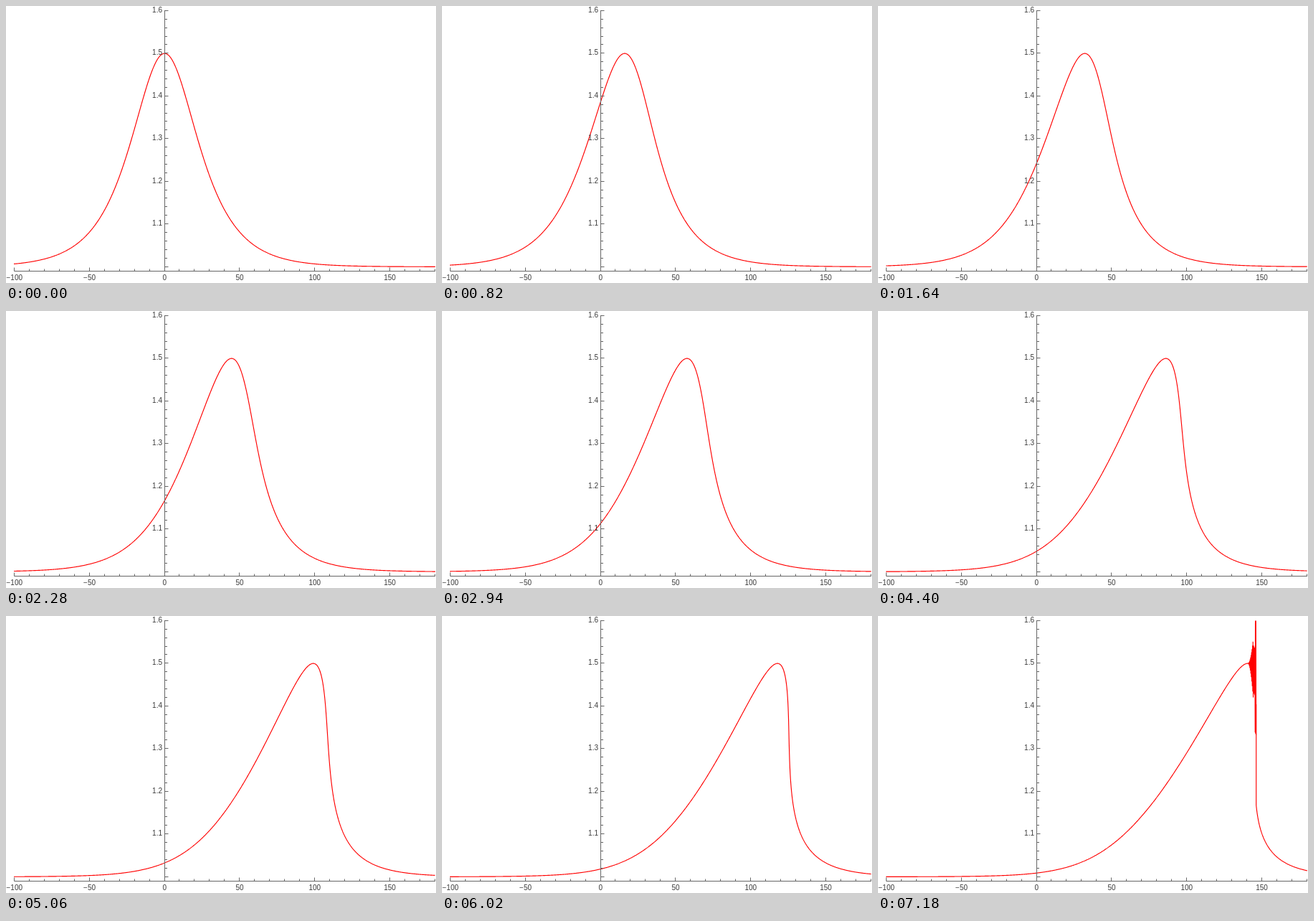
Write an HTML page that moves like this. It is 600 px wide and 386 px high and loops after 7.2 s.

```html
<!DOCTYPE html>
<html lang="en">
<head>
<meta charset="utf-8">
<title>Steepening wave</title>
<style>
  html, body { margin: 0; width: 100%; height: 100%; overflow: hidden; background: #fff; }
  svg { display: block; width: 600px; height: 386px; }
  text { font: 10px "Liberation Sans", Arial, sans-serif; fill: #3a3a3a; }
</style>
</head>
<body>
<svg viewBox="0 0 600 386">
  <clipPath id="plot"><rect x="11" y="6.5" width="588" height="363"/></clipPath>
  <path id="wave" clip-path="url(#plot)" fill="none" stroke="#f00" stroke-width="1.15" stroke-linejoin="bevel"/>
  <path id="axes" fill="none" stroke="#666" stroke-width="1"/>
  <g id="labels"></g>
</svg>
<script>
const LOOP = 7200, STEP = 20;
const PEAK_SPEED = 0.01957;          // plot units per ms
const BASE = 0.667, BEND = 0.055;    // local speed relative to the peak
const WIDTH = 20, HEIGHT = 0.5;
const BREAK = 129, BREAK_SPAN = 11.5; // peak travel where ripples start and grow
const wave = document.getElementById('wave');

const px = x => 221.3 + 2.095 * x;
const py = h => 363.4 - 594.6 * (h - 1);
const snap = v => Math.floor(v - 0.3) + 0.5;
const point = p => px(p.x).toFixed(2) + ' ' + py(p.h).toFixed(2);

function drawAxes() {
  let d = 'M221.5 6V369.5M11.5 369.5H599';
  let labels = '';
  for (let x = -100; x <= 180; x += 10) {
    const major = x % 50 === 0;
    d += `M${snap(px(x))} 369.5v${major ? -5 : -3}`;
    if (major) {
      const label = String(x).replace('-', '\u2212');
      labels += `<text x="${px(x)}" y="382" text-anchor="middle">${label}</text>`;
    }
  }
  for (let i = 0; i <= 30; i++) {
    const h = 1 + i / 50, y = py(h), major = i % 5 === 0;
    d += `M221.5 ${snap(y)}h${major ? 5 : 3.5}`;
    if (major && i) {
      labels += `<text x="218" y="${Math.floor(y + 2.6)}" text-anchor="end">${h.toFixed(1)}</text>`;
    }
  }
  document.getElementById('axes').setAttribute('d', d);
  document.getElementById('labels').innerHTML = labels;
}

// Each height travels at its own speed, so the front steepens.
function carry(start, shift) {
  const r = 1 / Math.cosh(start / WIDTH);
  const speed = BASE + (1 - BASE) * r + BEND * r * (1 - r);
  return { x: start + shift * speed, h: 1 + HEIGHT * r };
}

function ripple(u) {
  if (u < 0.65) return 0.07 * (u / 0.65) ** 2;
  return u < 0.85 ? 0.055 : 0.14;
}

// Dense zigzag between the crest and the shock.
function addRipples(crest, shift) {
  const shock = crest[crest.length - 1];
  const growth = Math.min(1, Math.max(0, (shift - BREAK) / BREAK_SPAN));
  const start = shock.x - 5.5 * growth;
  const line = crest.filter(p => p.x < start);
  const top = line[line.length - 1].h;
  let sign = 1;
  for (let x = start; x < shock.x; x += 0.16) {
    const u = (x - start) / (shock.x - start);
    sign = -sign;
    line.push({ x, h: top + 0.3 * (shock.h - top) * u * u + sign * growth ** 2 * ripple(u) });
  }
  return [...line, shock];
}

function profile(shift) {
  const crest = [], tail = [];
  let front = -Infinity, folded = false;
  for (let s = -240; s <= 190; s += 0.25) {
    const p = carry(s, shift);
    if (p.x < front) { folded = true; continue; }
    front = p.x;
    (folded ? tail : crest).push(p);
  }
  if (!folded) return crest;
  const shock = crest[crest.length - 1];
  return [...addRipples(crest, shift), { x: shock.x, h: tail[0].h }, ...tail];
}

function render(time) {
  const visible = profile(PEAK_SPEED * time).filter(p => p.x >= -100.5 && p.x <= 180.3);
  wave.setAttribute('d', 'M' + visible.map(point).join('L'));
}

let origin;
function tick(now) {
  origin ??= now;
  render(Math.floor(((now - origin) % LOOP) / STEP) * STEP);
  requestAnimationFrame(tick);
}

drawAxes();
render(0);
requestAnimationFrame(tick);
</script>
</body>
</html>
```
